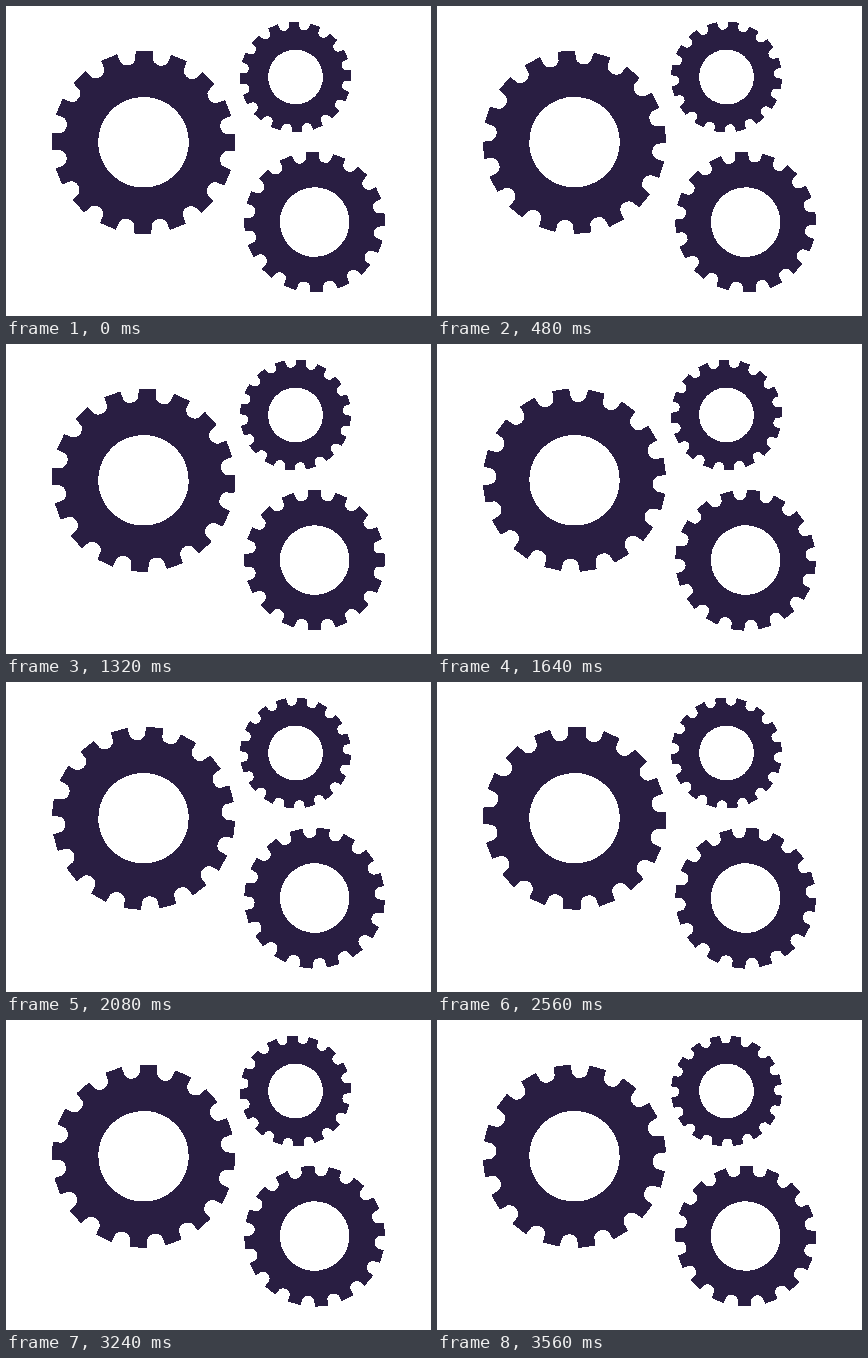
An HTML page with a canvas that plays this animation: 425x310 px, repeating every 3600 ms.

```html
<!DOCTYPE html>
<html lang="en">
<head>
<meta charset="utf-8">
<title>Gears</title>
<style>
  html, body { margin: 0; width: 100%; height: 100%; overflow: hidden; background: #fff; }
  canvas { display: block; }
</style>
</head>
<body>
<canvas id="stage" width="425" height="310"></canvas>
<script>
const W = 425, H = 310;
const ctx = document.getElementById('stage').getContext('2d', { willReadFrequently: true });
const LOOP = 3600, STEP = 40;
const TEETH = 16, PITCH = 2 * Math.PI / TEETH;
const RAD = Math.PI / 180;

// phase in degrees, speed in degrees per step
const gears = [
  { x: 137.5, y: 136.2, r: 91.6, phase: 0.4, speed: 1.425 },
  { x: 308.6, y: 216.1, r: 70.4, phase: -1.9, speed: -1.99 },
  { x: 289.5, y: 71, r: 55.5, phase: -1.6, speed: -1.13 }
];

// Unit gear: flat tooth tips joined by shallow round gullets, with a hole
function makeGear() {
  const path = new Path2D();
  const tip = 0.998, half = 0.093, hole = 0.494;
  const gullet = { at: 0.93, depth: 0.075, half: 0.088 };
  for (let i = 0; i < TEETH; i++) {
    const a = i * PITCH - Math.PI / 2, c = Math.cos(a), s = Math.sin(a);
    for (const side of [-half, half]) {
      path.lineTo(tip * c - side * s, tip * s + side * c);
    }
    const m = a + PITCH / 2;
    path.ellipse(gullet.at * Math.cos(m), gullet.at * Math.sin(m),
      gullet.depth, gullet.half, m, -Math.PI / 2, Math.PI / 2, true);
  }
  path.closePath();
  path.moveTo(hole, 0);
  path.arc(0, 0, hole, 0, 2 * Math.PI);
  return path;
}

const gearShape = makeGear();

// Turn soft edge pixels fully on or off
function hardenEdges() {
  const image = ctx.getImageData(0, 0, W, H), px = image.data;
  for (let i = 3; i < px.length; i += 4) {
    if (px[i] === 0 || px[i] === 255) continue;
    const on = px[i] > 127;
    px.set(on ? [41, 30, 66, 255] : [0, 0, 0, 0], i - 3);
  }
  ctx.putImageData(image, 0, 0);
}

function draw(time) {
  const step = Math.floor((time % LOOP) / STEP);
  ctx.clearRect(0, 0, W, H);
  ctx.fillStyle = 'rgb(41, 30, 66)';
  for (const { x, y, r, phase, speed } of gears) {
    ctx.save();
    ctx.translate(x, y);
    ctx.rotate((phase + speed * step) * RAD);
    ctx.scale(r, r);
    ctx.fill(gearShape, 'evenodd');
    ctx.restore();
  }
  hardenEdges();
}

let start;
function tick(now) {
  start ??= now;
  draw(Math.max(0, now - start));
  requestAnimationFrame(tick);
}
draw(0);
requestAnimationFrame(tick);
</script>
</body>
</html>
```
